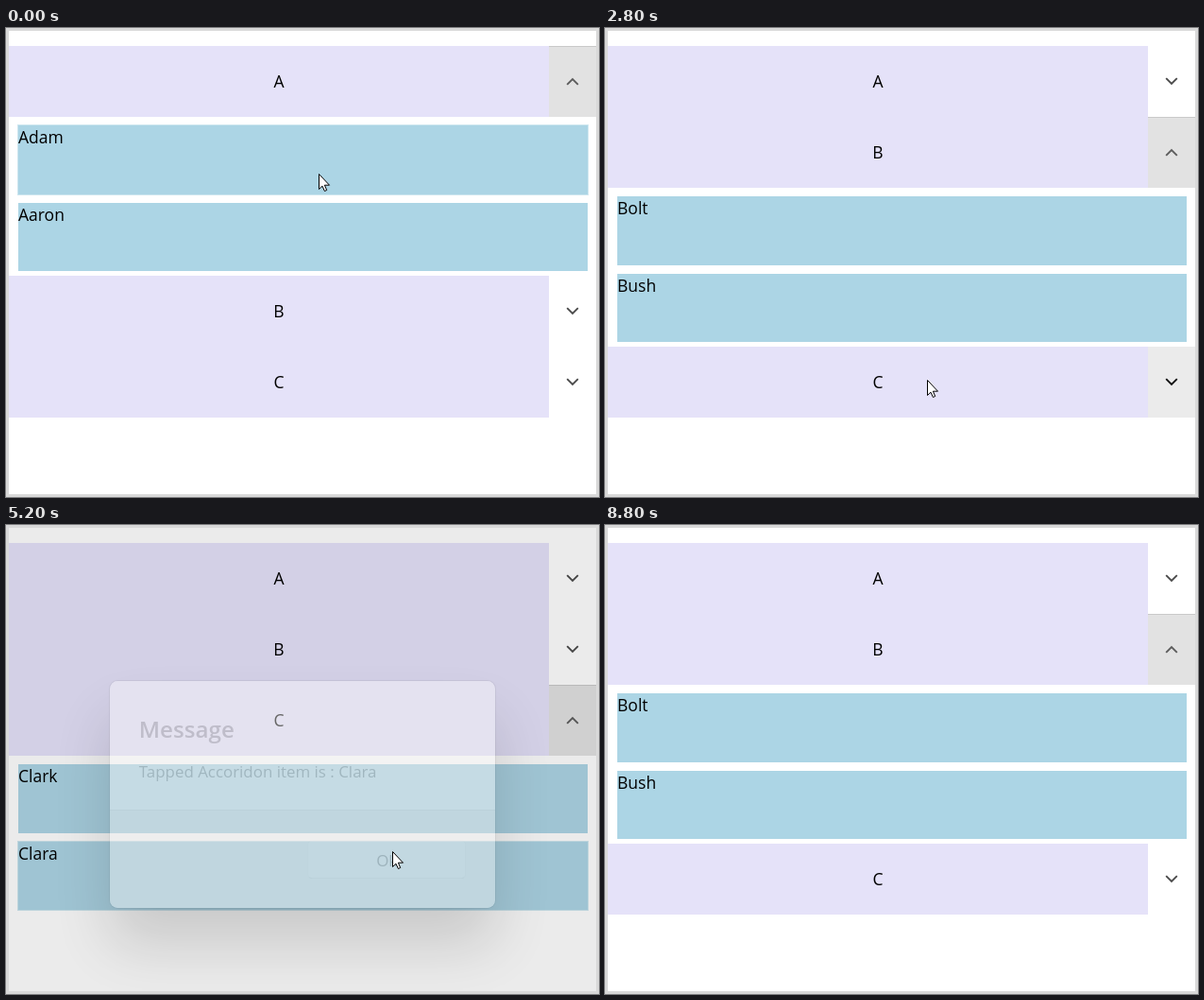
These frames come from a looping animation (628 by 496 pixels, 9600 ms). An HTML page:

```html
<!DOCTYPE html>
<html lang="en">
<head>
<meta charset="utf-8">
<title>Accordion</title>
<style>
  html, body { margin: 0; width: 100%; height: 100%; overflow: hidden; background: #fff; }
  body { position: relative; font: 17.5px "Open Sans", "Noto Sans", sans-serif; color: #000; }
  #list { position: absolute; left: 3px; top: 19px; width: 622px; }
  .section { position: relative; height: 75px; overflow: hidden; }
  .label { position: absolute; width: 572px; height: 75px; line-height: 75px; text-align: center; background: #e5e2f9; }
  .cell { position: absolute; left: 572px; width: 50px; height: 75px; box-sizing: border-box; }
  .cell path { fill: none; stroke: #4a4a4a; stroke-width: 1.9; }
  .hover .cell { background: #ebebeb; }
  .hover .cell path { stroke: #111; }
  .expanded .cell { background: #e2e2e2; box-shadow: inset 0 1px #c9c9c9; }
  .expanded .cell path { stroke: #5c5c5c; }
  .content { position: absolute; top: 75px; width: 622px; height: 168px; }
  .item { position: absolute; left: 10px; width: 603px; background: #acd5e5; }
  .item.over { box-shadow: 0 0 0 1px rgba(172, 213, 229, .6); }
  #dim { position: absolute; inset: 3px; background: rgba(0, 0, 0, .3); }
  #dialog { position: absolute; left: 115px; top: 168px; width: 398px; height: 234px; border-radius: 8px;
    background: linear-gradient(#fff 133px, #e5e5e5 133px 134px, #f3f3f3 134px);
    box-shadow: 0 0 0 1px rgba(0, 0, 0, .14), 0 38px 60px rgba(0, 0, 0, .36); color: #1a1a1a; font-size: 16.5px; }
  #title, #message { position: absolute; left: 30px; white-space: pre; }
  #title { top: 34px; font-size: 23.6px; font-weight: 600; line-height: 30px; }
  #message { top: 81px; line-height: 24px; }
  #ok { position: absolute; left: 204px; top: 164px; width: 164px; height: 40px; line-height: 39px; box-sizing: border-box;
    text-align: center; border: 1px solid #e5e5e5; border-bottom-color: #ccc; border-radius: 5px; background: #fbfbfb; }
  #frame { position: absolute; inset: 0; border: 3px solid #d9d9d9; }
  #cursor { position: absolute; left: 0; top: 0; width: 14px; height: 21px; overflow: visible; }
</style>
</head>
<body>
<div id="list"></div>
<div id="dim"></div>
<div id="dialog">
  <div id="title">Message</div>
  <div id="message"></div>
  <div id="ok">Ok</div>
</div>
<div id="frame"></div>
<svg id="cursor"><path d="M.5 .5V16.5L4 13.2 6.4 18.5 8.7 17.5 6.4 12.2H11.5Z" fill="#fff" stroke="#000"/></svg>
<script>
const LOOP = 9600, FRAME = 100, HEADER = 75, CONTENT = 168, LIST_TOP = 19;
const SLIDE_IN = 333, SLIDE_OUT = 167;

// Each open span: [start of expanding, start of collapsing]
const sections = [
  { label: "A", items: ["Adam", "Aaron"], spans: [[-1000, 2280]] },
  { label: "B", items: ["Bolt", "Bush"], spans: [[2450, 3080], [7660, 99999]] },
  { label: "C", items: ["Clark", "Clara"], spans: [[3250, 7237]] },
];
const dialogs = [
  { name: "Adam", open: 250, close: 1546 },
  { name: "Clark", open: 3650, close: 4630 },
  { name: "Clara", open: 5160, close: 5840 },
];
// Pointer stops: time, x, y
const stops = [
  [0, 331, 154], [200, 333, 157], [500, 340, 172], [1000, 404, 364], [1100, 404, 363], [1300, 404, 363],
  [1500, 404, 354], [1600, 404, 354], [1900, 396, 346], [2000, 396, 346], [2300, 345, 306], [2500, 341, 310],
  [2800, 341, 372], [3100, 341, 374], [3600, 326, 299], [4100, 326, 299], [4500, 405, 352], [5000, 409, 345],
  [5200, 409, 345], [5600, 409, 339], [6200, 409, 339], [6700, 365, 215], [7300, 357, 191], [7500, 357, 140],
  [7700, 357, 140], [8300, 362, 258], [8400, 362, 258], [8700, 17, 85],
];
const POINTER_GONE = 8800;

const $ = id => document.getElementById(id);
const clamp = v => Math.max(0, Math.min(1, v));
const mix = (a, b, p) => a + (b - a) * p;

function add(parent, className, html = "") {
  const el = document.createElement("div");
  el.className = className;
  el.innerHTML = html;
  return parent.appendChild(el);
}

for (const s of sections) {
  s.el = add($("list"), "section");
  add(s.el, "label", s.label);
  s.arrow = add(s.el, "cell", '<svg width="50" height="75"><path/></svg>').querySelector("path");
  s.content = add(s.el, "content");
  s.boxes = s.items.map((name, i) => {
    const box = add(s.content, "item", name);
    box.style.top = (i ? 91 : 9) + "px";
    box.style.height = (i ? 72 : 73) + "px";
    return box;
  });
}

function pointerAt(t) {
  const i = stops.findIndex(s => s[0] > t);
  if (i < 0) return stops[stops.length - 1].slice(1);
  const [a, b] = [stops[i - 1], stops[i]];
  const p = (t - a[0]) / (b[0] - a[0]);
  return [mix(a[1], b[1], p), mix(a[2], b[2], p)];
}

// Vertical shift of the content, or null while the section is closed
function contentShift(s, t) {
  const span = s.spans.find(([from, to]) => t >= from && t < to + SLIDE_OUT);
  if (!span) return null;
  const [from, to] = span;
  if (t < to) return -CONTENT * (1 - clamp((t - from) / SLIDE_IN)) ** 5;
  return -CONTENT * (1 - (1 - (t - to) / SLIDE_OUT) ** 1.3);
}

function drawSections(t, [x, y], modal) {
  const visible = t < POINTER_GONE;
  let top = LIST_TOP;
  for (const s of sections) {
    const shift = contentShift(s, t), open = shift !== null;
    const hover = visible && !modal && x > 20 && y >= top && y < top + HEADER;
    s.el.className = "section" + (hover ? " hover" : "") + (open ? " expanded" : "");
    s.el.style.height = HEADER + (open ? CONTENT : 0) + "px";
    s.arrow.setAttribute("d", open ? "M19.2 40.8 25 35 30.8 40.8" : "M19.2 34.2 25 40 30.8 34.2");
    s.content.style.display = open ? "" : "none";
    s.content.style.transform = `translateY(${Math.round(shift)}px)`;
    s.boxes.forEach(box => {
      const boxTop = top + HEADER + shift + parseInt(box.style.top);
      const over = visible && open && x > 13 && y >= boxTop && y < boxTop + parseInt(box.style.height);
      box.classList.toggle("over", over);
    });
    top += HEADER + (open ? CONTENT : 0);
  }
}

function drawDialog(t, d) {
  $("dialog").style.display = $("dim").style.display = d ? "" : "none";
  if (!d) return;
  const closing = t >= d.close;
  const opacity = closing ? 1 - clamp((t - d.close) / 120) : clamp((t - d.open) / 100);
  const grow = closing ? 1 - opacity ** 2 : (1 - clamp((t - d.open) / 250)) ** 4;
  $("dim").style.opacity = opacity ** 1.45;
  $("dialog").style.opacity = opacity;
  $("dialog").style.transform = `scale(${1 + .05 * grow})`;
  for (const id of ["title", "message", "ok"]) $(id).style.opacity = opacity;
  $("message").textContent = "Tapped Accoridon item is : " + d.name;
}

function draw(now) {
  const t = Math.floor(now % LOOP / FRAME) * FRAME;
  const pointer = pointerAt(t).map(Math.round);
  const dialog = dialogs.find(d => t >= d.open && t < d.close + 120);
  drawSections(t, pointer, dialog);
  drawDialog(t, dialog);
  $("cursor").style.display = t < POINTER_GONE ? "" : "none";
  $("cursor").style.transform = `translate(${pointer[0]}px, ${pointer[1]}px)`;
}

let start;
function tick(now) {
  start ??= now;
  draw(now - start);
  requestAnimationFrame(tick);
}
draw(0);
requestAnimationFrame(tick);
</script>
</body>
</html>
```
